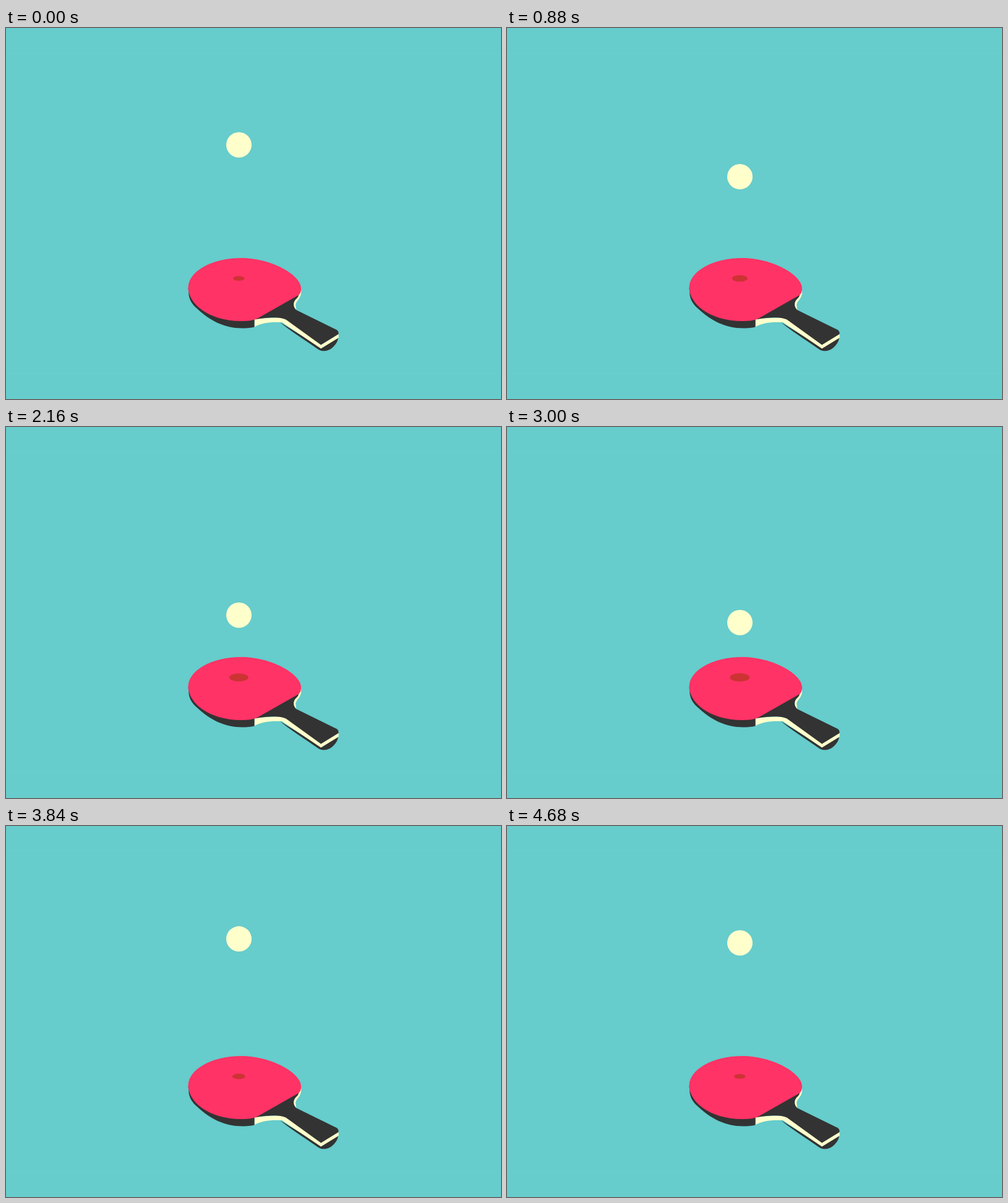
Animation of 800x600 px, one loop 4720 ms. Source, as an HTML page with a canvas:

```html
<!DOCTYPE html>
<html lang="en">
<head>
<meta charset="utf-8">
<title>Table tennis bounce</title>
<style>
  html, body { margin: 0; width: 100%; height: 100%; overflow: hidden; background: #66cccc; }
  canvas { display: block; width: 800px; height: 600px; }
</style>
</head>
<body>
<canvas id="stage" width="800" height="600"></canvas>
<script>
const ctx = document.getElementById('stage').getContext('2d');
const LOOP = 4720, STEP = 40;
const TEAL = '#66cccc', EDGE = '#6bcfcf', CREAM = '#ffffcc', RED = '#ff3366', DARK = '#333333', SHADE = '#cc3333';
const BALL = { x: 376.4, radius: 20.5, contactY: 386 };
const SHADOW = { x: 376.2, y: 405, contactRadius: 18.5, flatness: 0.42 };
const PIVOT = { x: 415.5, y: 447.5 };

// Highest points of the ball: step, ball height, shadow radius
const apexes = [
  { step: 0, y: 189, shadow: 9.2 },
  { step: 18, y: 226, shadow: 11.9 },
  { step: 38, y: 252, shadow: 12.8 },
  { step: 58, y: 277, shadow: 14.5 },
  { step: 78, y: 303, shadow: 15.5 },
  { step: 98, y: 162.5, shadow: 9.7 },
  { step: 116, y: 189, shadow: 9.2 }
];

// Back to front
const paddle = [
  [DARK, 'M443 476 C457 488 482 504 505 520 C512 524.5 522 522 528 516.5 C533 512 537 506 537 499 L508 516 Z'],
  [CREAM, 'M477 420 L477 427 C477 437 470 440 468 447 L469 456 C464 452 464 445 467 440 L472 431 Z'],
  [CREAM, 'M401.5 470 L401.5 483.5 C412 477 428 475 446 476 L509 518.5 L537.5 501 L537.5 493 L509 511 L452 468 Z'],
  [DARK, 'M473 431 L402 471.5 C430 466.5 445 468 453 472 L509 512.5 L537.5 495 C538 491 536 488.5 531 486.5 ' +
         'L469 456 C464 451 464 445 467 440.5 C470 437 473 435 473 431 Z'],
  [DARK, 'M294.5 420 L295.5 432 C297 441 301 447 309 454 C329 473 353 485.5 381 485.5 ' +
         'C390 485.5 396 485 401.5 483.5 L401.5 468 Z'],
  [RED, 'M294.5 420 C294.5 394.5 331 372 380 372 C430 372 477 400 477 421 C477 427 475 431 471 433 ' +
        'L405 470.5 C399 473 391 474 381 474 C325 474 294.5 444 294.5 420 Z']
].map(([color, d]) => ({ color, path: new Path2D(d) }));

const mix = (a, b, k) => a + (b - a) * k;
const smooth = k => k * k * (3 - 2 * k);
const clamp = k => Math.min(1, Math.max(0, k));

function bounce(step) {
  const i = Math.max(1, apexes.findIndex(a => a.step >= step));
  const from = apexes[i - 1], to = apexes[i];
  const half = (to.step - from.step) / 2;
  const falling = step < from.step + half;
  const apex = falling ? from : to;
  const k = (Math.abs(step - apex.step) / half) ** 2;
  return {
    y: mix(apex.y, BALL.contactY, k),
    shadow: mix(apex.shadow, SHADOW.contactRadius, k)
  };
}

// Blade dips, then swings back to strike the ball
function paddleAngle(step) {
  const dip = smooth(clamp((step - 77) / 6));
  const strike = smooth(clamp((step - 83) / 5));
  return -18 * (dip - strike) * Math.PI / 180;
}

function ellipse(color, x, y, rx, ry) {
  ctx.fillStyle = color;
  ctx.beginPath();
  ctx.ellipse(x, y, rx, ry, 0, 0, Math.PI * 2);
  ctx.fill();
}

function drawBackground() {
  ctx.fillStyle = TEAL;
  ctx.fillRect(0, 0, 800, 600);
  ctx.strokeStyle = EDGE;
  ctx.strokeRect(0.5, 40.5, 799, 518);
}

function drawPaddle(angle) {
  ctx.save();
  ctx.translate(PIVOT.x, PIVOT.y);
  ctx.rotate(angle);
  ctx.translate(-PIVOT.x, -PIVOT.y);
  for (const { color, path } of paddle) {
    ctx.fillStyle = color;
    ctx.fill(path);
  }
  ctx.restore();
}

function draw(time) {
  const step = Math.max(0, Math.floor((time % LOOP) / STEP) - 1);
  const { y, shadow } = bounce(step);
  drawBackground();
  drawPaddle(paddleAngle(step));
  ellipse(SHADE, SHADOW.x, SHADOW.y, shadow, shadow * SHADOW.flatness);
  ellipse(CREAM, BALL.x, y, BALL.radius, BALL.radius);
}

const start = performance.now();
function tick() {
  draw(performance.now() - start);
  requestAnimationFrame(tick);
}
tick();
</script>
</body>
</html>
```
